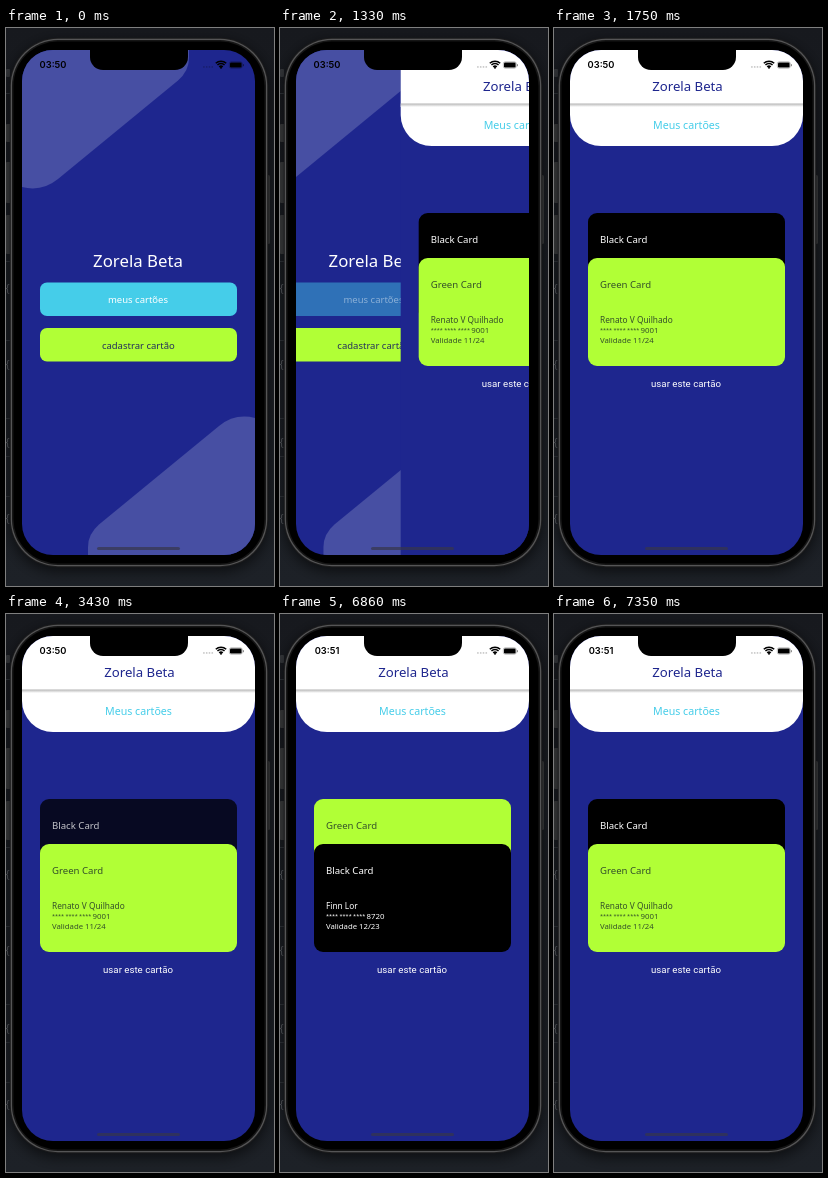
Recreate the animation shown at these times as an HTML page with a canvas. Size 268 by 558 pixels, loop 8 s.

```html
<!DOCTYPE html>
<html lang="pt">
<head>
<meta charset="utf-8">
<style>
  html, body { margin: 0; height: 100%; overflow: hidden; background: #181b20; }
  canvas { display: block; width: 268px; height: 558px; }
</style>
</head>
<body>
<canvas id="stage"></canvas>
<script>
const canvas = document.getElementById('stage');
const ctx = canvas.getContext('2d');
const ratio = window.devicePixelRatio || 1;
canvas.width = 268 * ratio;
canvas.height = 558 * ratio;

const LOOP = 8000, STEP = 70;
const BLUE = '#1e268e', CYAN = '#45cde9', GREEN = '#b1ff36';
const SANS = '"Noto Sans", sans-serif';
const APP = 'Zorela Beta';
const CARDS = {
  black: { title: 'Black Card', owner: 'Finn Lor', digits: '8720', expiry: '12/23', fill: '#000', ink: '#fff' },
  green: { title: 'Green Card', owner: 'Renato V Quilhado', digits: '9001', expiry: '11/24', fill: GREEN, ink: '#34502a' }
};

function box(x, y, w, h, r, fill) {
  ctx.beginPath();
  ctx.roundRect(x, y, w, h, r);
  ctx.fillStyle = fill;
  ctx.fill();
}

function text(str, x, y, size, fill, align = 'center', font = SANS, weight = 400) {
  ctx.font = `${weight} ${size}px ${font}`;
  ctx.textAlign = align;
  ctx.fillStyle = fill;
  ctx.fillText(str, x, y);
}

function layer(draw, { x = 0, alpha = 1 } = {}) {
  ctx.save();
  ctx.translate(x, 0);
  ctx.globalAlpha *= alpha;
  draw();
  ctx.restore();
}

const clamp = v => Math.min(1, Math.max(0, v));
const easeInOut = v => v < .5 ? 2 * v * v : 1 - 2 * (1 - v) ** 2;
const ramp = (t, start, length) => easeInOut(clamp((t - start) / length));

// Critically damped spring of the page push
function push(t) {
  if (t < 1200) return 0;
  if (t >= 1750) return 1;
  const k = (t - 1200) * .0142;
  return 1 - (1 + k) * Math.exp(-k);
}

// Tapped card fades to 0.2 and back
const tapFade = (t, start) => 1 - .8 * (ramp(t, start, 150) - ramp(t, start + 150, 250));

function corner() {
  ctx.fillStyle = '#474fa3';
  ctx.fill(new Path2D('M16 22H183V30Q183 43 172 52.5L52 151Q36 164 16 159Z'));
}

function home(t) {
  ctx.fillStyle = BLUE;
  ctx.fillRect(16, 22, 320, 505);
  corner();
  ctx.save();
  ctx.translate(265, 549);
  ctx.rotate(Math.PI);
  corner();
  ctx.restore();
  text(APP, 132, 239, 16.8, '#fff');
  layer(() => {
    box(34, 254.5, 197, 33.5, 7, CYAN);
    text('meus cartões', 132, 275, 9.5, '#fff');
  }, { alpha: t < 1120 ? 1 : .2 + .8 * ramp(t, 1232, 250) });
  box(34, 300, 197, 33.5, 7, GREEN);
  text('cadastrar cartão', 132.3, 320.5, 9.5, '#232f5c');
}

function card({ title, fill, ink }, y) {
  box(34, y, 197, 108, 9, fill);
  text(title, 46, y + 30, 9.6, ink, 'left');
}

function wallet(t) {
  ctx.fillStyle = BLUE;
  ctx.fillRect(16, 22, 233, 505);
  box(16, 22, 233, 96, [0, 0, 31, 31], '#fff');
  const shade = ctx.createLinearGradient(0, 75.5, 0, 79);
  shade.addColorStop(0, '#b4b4b4');
  shade.addColorStop(1, '#fff');
  ctx.fillStyle = shade;
  ctx.fillRect(16, 75.5, 233, 3.5);
  text(APP, 133.5, 63, 13.2, BLUE);
  text('Meus cartões', 132.5, 101, 10.65, CYAN);

  const swapped = t >= 3530 && t < 7100;
  const [back, front] = swapped ? [CARDS.green, CARDS.black] : [CARDS.black, CARDS.green];
  layer(() => card(back, 185), { alpha: tapFade(t, 3372) * tapFade(t, 6942) });
  card(front, 230);
  text(front.owner, 46, 295, 8.3, front.ink, 'left');
  text('**** **** ****', 46, 304, 5.5, front.ink, 'left');
  text(front.digits, 86.5, 305, 7.9, front.ink, 'left');
  text('Validade ' + front.expiry, 46, 315, 7.75, front.ink, 'left');
  text('usar este cartão', 132, 359, 9.7, '#fff', 'center', 'Roboto, sans-serif');
}

function statusBar(t) {
  text(t < 6860 ? '03:50' : '03:51', 47, 40, 9.3, '#000', 'center', 'Inter, sans-serif', 600);
  for (let i = 0; i < 4; i++) box(197 + i * 2.8, 38, 1.8, 1.8, 1, 'rgba(0,0,0,.22)');
  ctx.strokeStyle = '#000';
  ctx.lineWidth = 1.6;
  for (const r of [2.6, 5.2, 7.6]) {
    ctx.beginPath();
    ctx.arc(215, 40.8, r, -Math.PI * .74, -Math.PI * .26);
    ctx.stroke();
  }
  box(214, 38.8, 2, 2, 1, '#000');
  ctx.lineWidth = .6;
  ctx.strokeStyle = 'rgba(0,0,0,.45)';
  ctx.beginPath();
  ctx.roundRect(223.3, 33.8, 13, 6.4, 2);
  ctx.stroke();
  box(224, 34.5, 11.6, 5, 1.2, '#000');
  box(237, 36, 1, 2.2, .5, 'rgba(0,0,0,.45)');
}

function backdrop() {
  const shade = ctx.createLinearGradient(0, 0, 0, 558);
  shade.addColorStop(0, '#17191e');
  shade.addColorStop(1, '#1d2127');
  ctx.fillStyle = shade;
  ctx.fillRect(0, 0, 268, 558);
  ctx.fillStyle = '#30343a';
  for (const y of [65, 233, 312, 390, 428, 468]) ctx.fillRect(0, y, 5, 1);
  box(0, 41, 4, 8, 1, '#34363a');
  for (const y of [260, 336, 414, 490]) text('{', 1.5, y + 4, 11, '#5a5d62');
  for (const [y, h] of [[96, 18], [134, 41], [187, 39]]) box(0, y, 6, h, 1, '#3b3c3e');
  box(260, 147, 4, 69, 1.5, '#3b3c3e');
}

function phoneBody() {
  ctx.save();
  ctx.shadowColor = 'rgba(0,0,0,.6)';
  ctx.shadowBlur = 14 * ratio;
  ctx.shadowOffsetY = 4 * ratio;
  box(3.8, 9.8, 258.4, 529.4, 48, '#1c1c1d');
  ctx.restore();
  box(4.8, 10.8, 256.4, 527.4, 47, '#555556');
  box(6, 12, 254, 525, 46, '#161616');
  box(7.5, 13.5, 251, 522, 44.5, '#000');
}

function draw(t) {
  ctx.setTransform(ratio, 0, 0, ratio, 0, 0);
  backdrop();
  phoneBody();
  ctx.save();
  ctx.beginPath();
  ctx.roundRect(16, 22, 233, 505, 31);
  ctx.clip();
  const p = push(t);
  if (p < 1) layer(() => home(t), { x: -70 * p });
  if (p > 0) layer(() => wallet(t), { x: 233 * (1 - p) });
  statusBar(t);
  box(91, 519, 83, 3, 1.5, 'rgba(55,55,75,.7)');
  box(84, 12, 98, 30, [0, 0, 13, 13], '#000');
  ctx.restore();
}

function tick() {
  const t = performance.now() % LOOP;
  draw(Math.floor(t / STEP) * STEP);
  requestAnimationFrame(tick);
}
tick();
</script>
</body>
</html>
```
